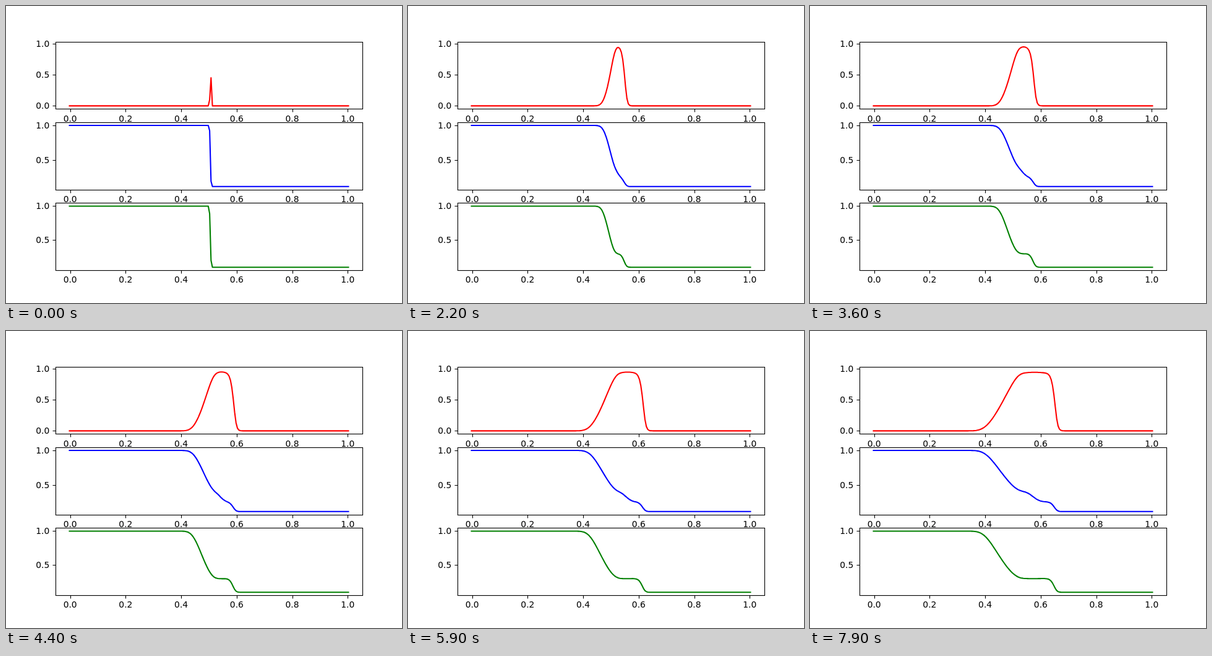
An HTML page that plays this animation: 640 by 480 pixels, repeating every 8 s.

```html
<!DOCTYPE html>
<html lang="en">
<head>
<meta charset="utf-8">
<title>Shock tube</title>
<style>
  html, body { margin: 0; width: 100%; height: 100%; overflow: hidden; background: #fff; }
  svg { display: block; }
  text { font: 13.889px "DejaVu Sans", sans-serif; fill: #000; }
  .axis { fill: none; stroke: #000; stroke-width: 1.11; }
  .curve { fill: none; stroke-width: 2.083; stroke-linejoin: round; stroke-linecap: square; }
</style>
</head>
<body>
<svg id="stage" width="640" height="480" viewBox="0 0 640 480"></svg>
<script>
const FRAMES = 80, FRAME_MS = 100;
const CELLS = 202, DX = 0.005, DT_OVER_DX = 0.2, GAMMA = 1.4, G1 = GAMMA - 1;

// Sod shock tube, Steger-Warming flux splitting, first order in space and time.
const conserved = (rho, u, p) => [rho, rho * u, p / G1 + rho * u * u / 2];

function primitive([rho, m, e]) {
  const u = m / rho;
  return { rho, u, p: G1 * (e - m * u / 2) };
}

function splitFlux(state, sign) {
  const { rho, u, p } = primitive(state);
  const c = Math.sqrt(GAMMA * p / rho);
  const [l1, l2, l3] = [u, u + c, u - c].map(l => (l + sign * Math.abs(l)) / 2);
  const k = rho / (2 * GAMMA);
  return [
    k * (2 * G1 * l1 + l2 + l3),
    k * (2 * G1 * l1 * u + l2 * (u + c) + l3 * (u - c)),
    k * (G1 * l1 * u * u + l2 * (u + c) ** 2 / 2 + l3 * (u - c) ** 2 / 2
      + (3 - GAMMA) * (l2 + l3) * c * c / (2 * G1))
  ];
}

function advance(cells) {
  const right = cells.map(s => splitFlux(s, 1));
  const left = cells.map(s => splitFlux(s, -1));
  return cells.map((s, i) => i === 0 || i === CELLS - 1 ? s : s.map((q, k) =>
    q - DT_OVER_DX * (right[i][k] - right[i - 1][k] + left[i + 1][k] - left[i][k])));
}

const AXES_X = 80, AXES_W = 496, AXES_H = 108.706;
const X_UNIT = AXES_W / 1.1 / ((CELLS - 1) * DX);
const xPos = x => AXES_X + AXES_W / 22 + (x + DX / 2) * X_UNIT;

const plots = [
  { key: "u", color: "#ff0000", top: 57.6, min: 0, max: 0.98, ticks: [0, 0.5, 1] },
  { key: "rho", color: "#0000ff", top: 188.047, min: 0.125, max: 1, ticks: [0.5, 1] },
  { key: "p", color: "#008000", top: 318.494, min: 0.1, max: 1, ticks: [0.5, 1] }
];

const yPos = (plot, v) =>
  plot.top + AXES_H * (1 - 1 / 22 - (v - plot.min) / (plot.max - plot.min) / 1.1);

const stage = document.getElementById("stage");
const snap = v => Math.round(v) + 0.5;

function add(tag, attrs, content = "") {
  const el = document.createElementNS("http://www.w3.org/2000/svg", tag);
  for (const name in attrs) el.setAttribute(name, attrs[name]);
  el.textContent = content;
  return stage.appendChild(el);
}

function label(x, y, anchor, value) {
  add("text", { x, y, "text-anchor": anchor }, value.toFixed(1));
}

for (const plot of plots) {
  const left = snap(AXES_X), top = snap(plot.top), bottom = snap(plot.top + AXES_H);
  const box = { x: left, y: top, width: AXES_W, height: bottom - top };
  add("rect", { ...box, fill: "#fff" });
  let ticks = "";
  for (let i = 0; i <= 5; i++) {
    const x = xPos(i / 5);
    ticks += `M${snap(x)} ${bottom}v5`;
    label(x, Math.floor(plot.top + AXES_H + 20.75), "middle", i / 5);
  }
  for (const v of plot.ticks) {
    const y = yPos(plot, v);
    ticks += `M${left} ${snap(y)}h-5`;
    label(70.3, Math.round(y) + 5, "end", v);
  }
  add("path", { class: "axis", d: ticks });
  plot.curve = add("path", { class: "curve", stroke: plot.color });
  add("rect", { ...box, class: "axis" });
}

const tracePath = (plot, cells) => "M" + cells.map((s, i) =>
  xPos((i - 0.5) * DX).toFixed(2) + " " + yPos(plot, s[plot.key]).toFixed(2)).join("L");

let cells = Array.from({ length: CELLS }, (_, i) =>
  i <= CELLS / 2 ? conserved(1, 0, 1) : conserved(0.125, 0, 0.1));
const frames = Array.from({ length: FRAMES }, () => {
  cells = advance(cells);
  const values = cells.map(primitive);
  return plots.map(plot => tracePath(plot, values));
});

function render(ms) {
  const frame = frames[Math.floor(ms / FRAME_MS) % FRAMES];
  plots.forEach((plot, i) => plot.curve.setAttribute("d", frame[i]));
}

const start = performance.now();
function tick() {
  render(performance.now() - start);
  requestAnimationFrame(tick);
}
tick();
</script>
</body>
</html>
```
